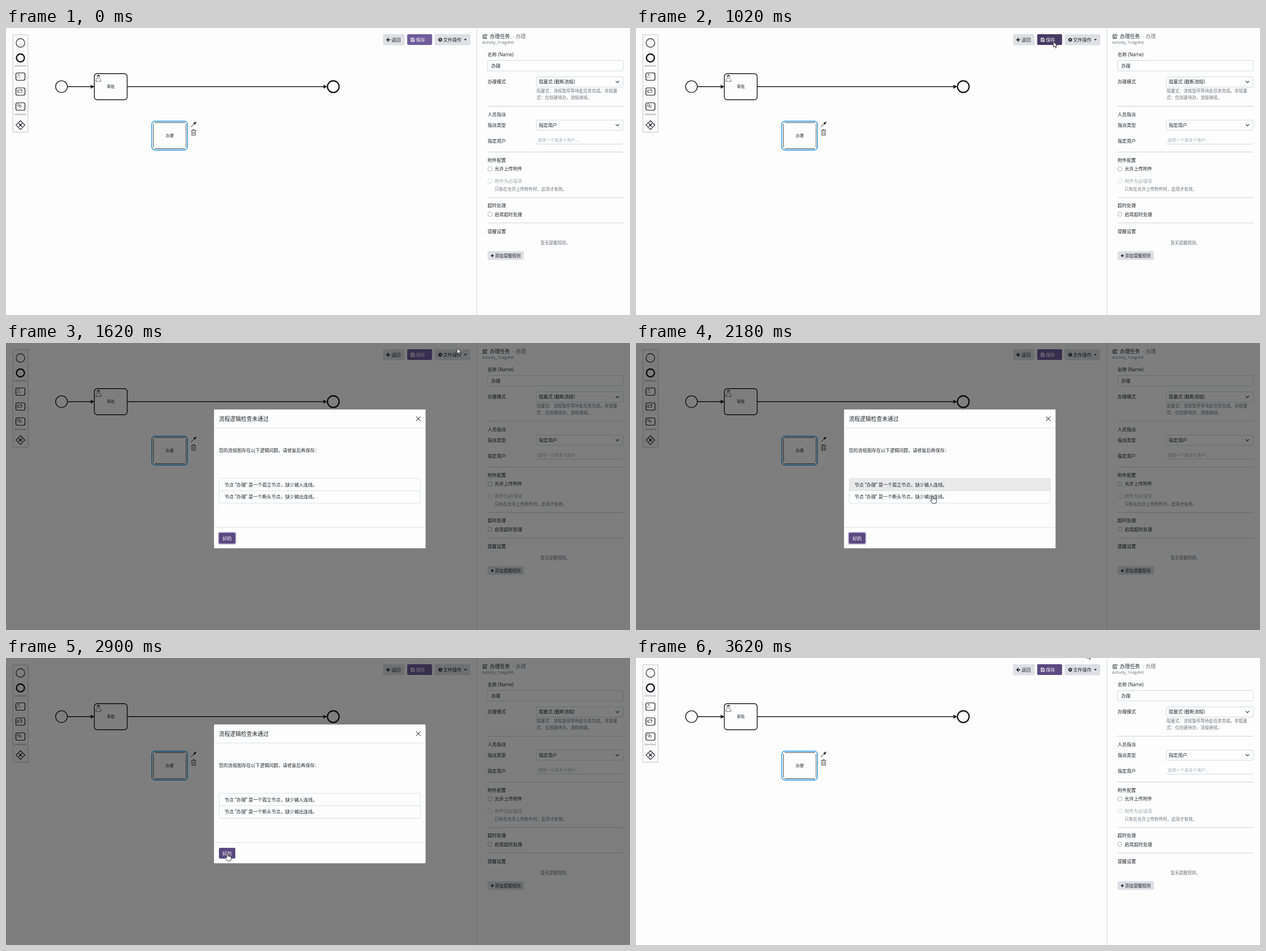
An HTML page with a canvas that plays this animation: 1102x508 px, repeating every 3.99 s.

```html
<!DOCTYPE html>
<html lang="zh-CN">
<head>
<meta charset="utf-8">
<title>流程设计</title>
<style>
html, body { margin: 0; width: 100%; height: 100%; overflow: hidden; background: #fdfdfd; }
canvas { display: block; width: 1102px; height: 508px; }
</style>
</head>
<body>
<canvas id="stage" width="1102" height="508"></canvas>
<script>
const W = 1102, H = 508, LOOP = 3990;
const ctx = document.getElementById('stage').getContext('2d');
const FONT = '"Open Sans", "Noto Sans CJK SC", "Noto Sans CJK", sans-serif';
const BG = '#fdfdfd', INK = '#212529', GRAY = '#6c757d', EDGE = '#d5d9dd', BLACK = '#1c1c20';
const NORMAL = [111, 92, 155], HOVER = [90, 74, 129], ACTIVE = [71, 59, 100];
const AXIS = 103.8; // height of the flow line

// ---- helpers ----
const rgb = c => `rgb(${c.map(Math.round)})`;
const mix = (a, b, k) => a.map((v, i) => v + (b[i] - v) * k);

function text(s, x, cy, size = 8.1, color = INK, weight = 400, align = 'left') {
  ctx.font = `${weight} ${size}px ${FONT}`;
  ctx.textAlign = align;
  ctx.fillStyle = color;
  ctx.fillText(s, x, cy + size * 0.37);
}

function box(x, y, w, h, r, fill, stroke, lw = 1) {
  ctx.beginPath();
  ctx.roundRect(x, y, w, h, r);
  if (fill) { ctx.fillStyle = fill; ctx.fill(); }
  if (stroke) { ctx.strokeStyle = stroke; ctx.lineWidth = lw; ctx.stroke(); }
}

function path(d, stroke, lw = 1, fill, x = 0, y = 0) {
  const p = new Path2D(d);
  ctx.save();
  ctx.translate(x, y);
  if (fill) { ctx.fillStyle = fill; ctx.fill(p); }
  if (stroke) { ctx.strokeStyle = stroke; ctx.lineWidth = lw; ctx.stroke(p); }
  ctx.restore();
}

function ring(x, y, r, lw) {
  ctx.beginPath();
  ctx.arc(x, y, r, 0, Math.PI * 2);
  ctx.strokeStyle = BLACK;
  ctx.lineWidth = lw;
  ctx.stroke();
}

const rule = (x1, x2, y, color = '#d0d2d4', lw = 1) => path(`M${x1} ${y}H${x2}`, color, lw);
const heading = (s, cy) => text(s, 850.5, cy, 8.1, INK, 500);

// ---- page parts ----
function person(x, y, s) {
  ctx.save();
  ctx.translate(x, y);
  ctx.scale(s, s);
  path('M-5 6V3Q-4 0 -1.5 -.5H1.5Q4 0 5 3V6Z M-3 6V3.5M3 6V3.5', '#555', 0.7, BG);
  path('M-2.4 -3A2.4 2.8 0 1 0 2.4 -3A2.4 2.8 0 1 0 -2.4 -3', '#555', 0.7, BG);
  path('M-2.6 -3Q-2.5 -6 0 -6Q2.5 -6 2.6 -3Q0 -5 -2.6 -3', null, 1, '#222');
  ctx.restore();
}

function palette() {
  box(12, 12, 27, 172.5, 0, '#fafafa', '#c8c8ca');
  ring(25.5, 26.5, 7.6, 1.1);
  ring(25.5, 53, 7, 2.4);
  rule(15, 36, 67, '#cbcbcb', 2.6);
  rule(15, 36, 153, '#cbcbcb', 2.6);
  for (const y of [79.5, 106, 132.5]) box(17.5, y, 16, 13, 2.4, BG, BLACK, 1.2);
  person(22.3, 84.8, 0.55);
  path('M20 110H22V114H20ZM22 110.5L24 109H28V110.5H25.5H28V114H22', '#333', 0.7);
  path('M20 136.5a2 2 0 1 0 4 0a2 2 0 1 0 -4 0M23 138.5a2 2 0 1 0 4 0a2 2 0 1 0 -4 0', '#333', 0.8);
  path('M25.5 164L33.3 171.8L25.5 179.6L17.7 171.8Z', BLACK, 1.1);
  path('M22.7 169L28.3 174.6M28.3 169L22.7 174.6', BLACK, 1.4);
}

function flow(x1, x2) {
  rule(x1, x2 - 4, AXIS, BLACK, 1.4);
  path('M0 0L-7 -3.4V3.4Z', null, 1, BLACK, x2, AXIS);
}

function diagram() {
  ring(98, AXIS, 10.4, 1.3);
  flow(108.5, 156.5);
  box(156, 80.8, 58, 46.2, 5, BG, BLACK, 1.4);
  person(163.2, 89, 0.95);
  text('审批', 185, AXIS, 7.1, INK, 400, 'center');
  flow(214, 567.5);
  ring(578, AXIS, 10.3, 2.3);

  box(257.5, 165, 63, 51, 5.5, BG, '#1a8fdc', 1.3);
  path('M262.5 167.5H316M262.5 213.5H316', '#4b5056');
  path('M260.5 169.5V211.5M318 169.5V211.5', '#5d5854');
  text('办理', 289, 190, 7.1, INK, 400, 'center');
  path('M326.5 175.5L334 168', BLACK, 1);
  path('M336.5 165.5L330.8 168.2L333.8 171.2Z', null, 1, BLACK);
  path('M327 181.5H335.5M329.8 181V179.8H332.8V181M328 182V190H334.6V182M330 183.5V188.5M332.6 183.5V188.5', '#444', 0.9);
}

function toolbar(save) {
  box(666, 11, 38, 19.5, 2, '#dde0e4');
  path('M672.5 20.8H679M675.8 17.5L672.5 20.8L675.8 24.1', INK, 1.5);
  text('返回', 681, 20.8);

  box(708.5, 11, 44, 19, 2, rgb(save));
  path('M715.2 17.8H720L721.4 19.2V24H715.2ZM716.6 17.8V20H719.4V17.8M716.6 24V22H720V24', '#fff', 0.9);
  text('保存', 724, 20.8, 8.1, '#fff');

  box(757, 11, 63, 19.5, 2, '#dde0e4');
  ctx.setLineDash([1.3, 1.1]);
  path('M763.9 20.8a3 3 0 1 0 6 0a3 3 0 1 0 -6 0', INK, 1.4);
  ctx.setLineDash([]);
  path('M764.9 20.8a2 2 0 1 0 4 0a2 2 0 1 0 -4 0', INK, 1.6);
  text('文件操作', 772, 20.8);
  path('M808.8 19.5H813.8L811.3 22.2Z', null, 1, INK);
}

function select(s, y) {
  box(936.5, y + 0.5, 153.5, 18, 2, BG, EDGE);
  text(s, 941, y + 9.3);
  path('M1076.8 -1.4L1079.8 1.6L1082.8 -1.4', '#343a40', 1.2, null, 0, y + 9.3);
}

function check(s, cy, color = INK, edge = '#a9aeb3') {
  box(851.2, cy - 3.5, 7, 7, 1.8, BG, edge, 0.9);
  text(s, 863, cy, 8.1, color);
}

function panel() {
  path('M831.5 0V508', EDGE, 1);
  path('M847 12H842.5V18.5H848.5V16M844.8 16.5V14.8L848.5 11L850 12.5L846.3 16.3Z', INK, 1);
  text('办理任务', 854.5, 14.7, 8.9, INK, 500);
  text('- 办理', 895, 14.7, 8.9, GRAY);
  text('Activity_1ndg4h6', 841, 25.7, 7.1, GRAY);

  text('名称 (Name)', 850.5, 47);
  box(850.5, 57.5, 239.5, 18.5, 2, BG, EDGE);
  text('办理', 857, 67);
  text('办理模式', 850.5, 95.3);
  select('阻塞式 (截断流程)', 86);
  text('阻塞式：流程暂停等待此任务完成。非阻塞', 937, 111, 7.5, GRAY);
  text('式：仅创建待办，流程继续。', 937, 123.3, 7.5, GRAY);

  heading('人员指派', 153);
  text('指派类型', 850.5, 172);
  select('指定用户', 162.5);
  text('指定用户', 850.5, 200.3);
  text('选择一个或多个用户...', 939, 198, 7.4, '#a8acb1');
  path('M936.5 203Q936.5 205.5 939 205.5H1088Q1090 205.5 1090 203', EDGE, 1);

  heading('附件配置', 234);
  check('允许上传附件', 249.5);
  check('附件为必填项', 271, '#a3a6a9', '#d4d7da');
  text('只有在允许上传附件时，此项才有效。', 863, 285, 7.5, GRAY);

  heading('超时处理', 314.3);
  check('启用超时处理', 329.6);

  heading('提醒设置', 359.8);
  text('暂无提醒规则。', 944, 380, 7.5, GRAY);
  box(850.5, 395, 64, 15.5, 2, '#dde0e4');
  path('M856 403H861.6M858.8 400.2V405.8', INK, 1.5);
  text('添加提醒规则', 863.5, 403, 7.6);
  for (const y of [138.5, 219.5, 300, 345]) rule(850.5, 1090.5, y);
}

function dialog(row, ok, focus) {
  ctx.fillStyle = 'rgba(0,0,0,.5)';
  ctx.fillRect(0, 0, W, H);
  box(367, 117.3, 374.3, 246.4, 1.5, BG, '#6e6e70', 0.6);
  text('流程逻辑检查未通过', 376, 134.3, 9.75);
  path('M724.3 130.2L731.9 137.8M731.9 130.2L724.3 137.8', '#4a4d50', 1.1);
  rule(367, 741, 150.5, '#dfe2e5');
  text('您的流程图存在以下逻辑问题，请修复后再保存：', 376, 190.3, 8.05);

  if (row >= 0) {
    ctx.fillStyle = '#e9e9ea';
    ctx.fillRect(376.5, 239.5 + row * 22, 355.5, 22);
  }
  box(376.5, 239.5, 355.5, 44, 2, null, '#dfe2e5');
  rule(376.5, 732, 261.5, '#dfe2e5');
  text('节点 “办理” 是一个孤立节点，缺少输入连线。', 386, 250.6);
  text('节点 “办理” 是一个断头节点，缺少输出连线。', 386, 272.4);

  rule(367, 741, 326.5, '#dfe2e5');
  if (focus) box(374.3, 334.3, 32.4, 22.4, 3.5, '#bfb6d4');
  box(376, 336, 29, 19, 2, rgb(ok));
  text('好的', 390.5, 345.8, 8.1, '#fff', 400, 'center');
}

// ---- pointer ----
// Each run is a list of [time, x, y]; the pointer rests between runs.
const RUNS = [
  [[0, 800, -20], [120, 775, 0], [200, 745, 30], [260, 732, 58], [360, 737, 24]],
  [[1020, 737, 24], [1060, 736, 23]],
  [[1300, 736, 23], [1420, 756, 59], [1540, 799, 36], [1660, 792, 1], [1780, 776, 19]],
  [[1940, 776, 19], [2180, 524, 271], [2500, 428, 343]],
  [[2500, 428, 343], [2740, 391, 346]],
  [[3060, 397, 341], [3300, 585, 165], [3460, 735, 22], [3580, 796, -10], [3620, 797, -9]]
];

function pointer(t) {
  const run = RUNS.filter(r => r[0][0] <= t).pop();
  const last = run.length - 1;
  if (t >= run[last][0]) return run[last].slice(1);
  const i = run.findIndex((k, n) => n < last && t < run[n + 1][0]);
  const a = run[i], b = run[i + 1], d = b[0] - a[0], u = (t - a[0]) / d;
  const slope = (n, c) => n <= 0 || n >= last ? 0
    : (run[n + 1][c] - run[n - 1][c]) / (run[n + 1][0] - run[n - 1][0]);
  const h = u * u * (3 - 2 * u);
  return [1, 2].map(c => a[c] + (b[c] - a[c]) * h
    + d * u * (1 - u) * (slope(i, c) * (1 - u) - slope(i + 1, c) * u));
}

const inside = ([x, y], l, t, r, b) => x >= l && x < r && y >= t && y < b;

function drawArrow(x, y) {
  path('M0 0V9.8L2.2 7.7L3.8 11.5L5.5 10.8L3.9 7.1H7Z', '#222', 0.9, '#fff', x, y);
}

function drawHand(x, y) {
  path('M-1.2 7.5V1Q-1.2 0 0 0Q1.1 0 1.1 1V5Q2.4 4 3.2 5.2Q4.5 4.4 5.2 5.6Q6.8 5.2 6.8 6.8V9.5Q6.5 11 5.5 13H-.2Q-1 11.2 -3.6 8.5Q-4 7 -2.6 6.8Z',
    '#222', 0.9, '#fff', x, y);
}

// ---- timeline ----
function saveColor(t, open, before) {
  if (open) return mix(ACTIVE, NORMAL, Math.min(1, (t - 1060) / 120));
  if (t === 1020) return ACTIVE;
  const hovered = t >= 3460 || (t < 1020 && inside(before, 709, 11, 752, 31));
  return hovered ? HOVER : NORMAL;
}

function render(time) {
  const shift = time < 700 ? 0 : 20;
  const t = Math.floor((time - shift) / 40) * 40 + shift;
  const pos = pointer(t);
  const before = pointer(Math.max(0, t - 40)); // hover styles lag one step
  const open = t >= 1060 && t < 3060;

  ctx.fillStyle = BG;
  ctx.fillRect(0, 0, W, H);
  palette();
  diagram();
  toolbar(saveColor(t, open, before));
  panel();

  let hand = false;
  if (open) {
    const onRow = p => inside(p, 376, 239, 732, 283);
    const onOk = inside(pos, 376, 336, 405, 355);
    const focus = t >= 1140 && t < 2860;
    const row = onRow(before) || onRow(pos) ? +(before[1] >= 261.5) : -1;
    dialog(onRow(pos) ? row : -1, focus || onOk ? HOVER : NORMAL, focus);
    hand = onOk || onRow(pos);
  }
  if (t >= 40) (hand ? drawHand : drawArrow)(...pos);
}

const start = performance.now();
function tick() {
  render((performance.now() - start) % LOOP);
  requestAnimationFrame(tick);
}
tick();
</script>
</body>
</html>
```
